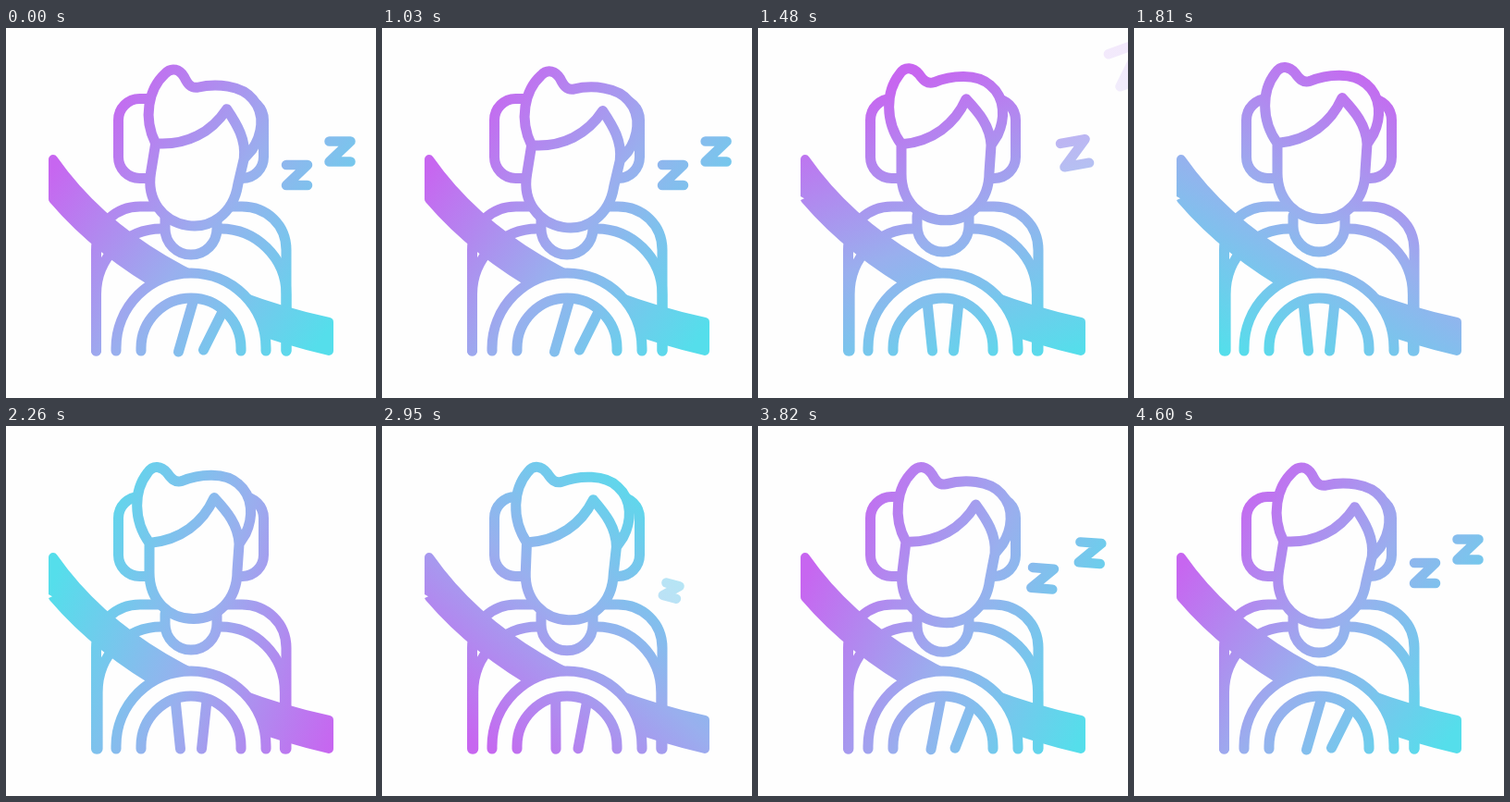
An HTML page with a canvas that plays this animation: 400 px wide and 400 px high, repeating every 4.63 s.

```html
<!DOCTYPE html>
<html lang="en">
<head>
<meta charset="utf-8">
<title>Drowsy driver</title>
<style>
html, body { margin: 0; width: 100%; height: 100%; overflow: hidden; background: #fefefe; }
canvas { display: block; width: 400px; height: 400px; }
</style>
</head>
<body>
<canvas id="stage" width="400" height="400"></canvas>
<script>
const ctx = document.getElementById('stage').getContext('2d');
const LOOP = 4630, START = 1030, END = 4600;
const PAPER = '#fefefe', PURPLE = '#c766f0', MIDDLE = '#99afee', CYAN = '#55deeb';
const LINE = 11;

const headrest = new Path2D();
headrest.roundRect(121.5, 76.5, 157, 86, 23);
const seat = new Path2D('M97.5 349V240C97.5 213 118 193 145 193H255C282 193 303 213 303 240V349');
const belt = new Path2D('M51 142C112 229 212 287 349 318V349C240 323 129 276 51 185Z');
const wheelDisc = new Path2D('M119 349V346A81 81 0 0 1 281 346V349Z');
const wheelRim = new Path2D('M119 349V346A81 81 0 0 1 281 346V349M146 349V346A54 54 0 0 1 254 346V349');
const zShape = new Path2D('M-11.5 -11H11.5L-11.5 11H11.5');

// Head parts are measured from the point the head turns about.
const hair = 'M-48 -38C-66 -63 -65 -95 -50 -114C-44 -123 -35 -121 -29 -114' +
  'C-24 -107 -20 -103 -13 -105C6 -113 34 -115 48 -102C65 -88 64 -65 56 -48L49 -37';
const jaw = 'L47 -8C47 24 25 44 0 44C-27 44 -48 24 -48 -6V-38';
const fringe = 'M-48 -38C-14 -41 10 -60 22 -87C36 -72 48 -58 49 -37';
const headOutline = new Path2D(hair + jaw);
const headLines = new Path2D(hair + fringe + jaw);

const nearZ = { x: 314.5, y: 159, leave: 1255, arrive: 2800, settle: 4600, sway: 7, rise: 22 };
const farZ = { x: 361, y: 133.5, leave: 1030, arrive: 3150, settle: 4300, sway: 2, rise: 15 };

const mix = (a, b, k) => a + (b - a) * k;
const phase = (t, from, to) => Math.min(1, Math.max(0, (t - from) / (to - from)));
const smooth = u => u * u * (3 - 2 * u);
const bump = (t, from, to) => Math.sin(Math.PI * phase(t, from, to));

function place(path, x, y, degrees, scale = 1) {
  const placed = new Path2D();
  placed.addPath(path, new DOMMatrix().translate(x, y).rotate(degrees).scale(scale));
  return placed;
}

// One full turn of the gradient, quicker at first and settling slowly.
function makePaint(t) {
  const turn = smooth(1 - (1 - phase(t, START, END)) ** 1.5);
  const angle = Math.PI * (.2 + 2 * turn);
  const dx = 172 * Math.cos(angle), dy = 172 * Math.sin(angle);
  const paint = ctx.createLinearGradient(216 - dx, 217 - dy, 216 + dx, 217 + dy);
  [PURPLE, MIDDLE, CYAN].forEach((color, i) => paint.addColorStop(i / 2, color));
  return paint;
}

function fill(path, style) {
  ctx.fillStyle = style;
  ctx.fill(path);
}

function drawZ(z, t) {
  const out = phase(t, z.leave, z.leave + 500);
  const arriving = t > z.arrive;
  const grown = phase(t, z.arrive, z.settle), rest = (1 - grown) ** 1.6;
  const pose = arriving
    ? [z.x - z.sway * Math.sin(Math.PI * grown), z.y + z.rise * rest, 17 * rest, Math.min(1, .3 + 4 * grown)]
    : [z.x + 43 * Math.sin(out * Math.PI / 2), z.y - 116 * out ** 2, -22 * out, 1 + .85 * out ** 2];
  ctx.globalAlpha = arriving ? Math.min(1, 6 * grown) : 1 - out ** 1.7;
  ctx.lineWidth = 10.5;
  ctx.stroke(place(zShape, ...pose));
  ctx.globalAlpha = 1;
}

function drawBody(tilt) {
  const inset = mix(1.6, 0, tilt), left = 97.5 + inset, right = 303 - inset;
  ctx.stroke(new Path2D(`M${left} 349V288C${left} 248 130 217 168 217` +
    `M232 217C270 217 ${right} 248 ${right} 288V349`));
  const neck = mix(214, 217, tilt);
  ctx.stroke(new Path2D(`M172 203V${neck}A28 28 0 0 0 228 ${neck}V203`));
}

function drawHead(t, tilt) {
  const nod = 5 * bump(t, 1000, 1250), jolt = 2 * bump(t, 1400, 2150);
  const pose = [203, 164.5 + 5.5 * tilt + nod - jolt, 9.2 * tilt];
  fill(place(headOutline, ...pose), PAPER);
  ctx.stroke(place(headLines, ...pose));
}

function drawBelt(paint, tilt) {
  ctx.lineWidth = 10;
  fill(belt, paint);
  ctx.stroke(belt);
  if (tilt < .5) fill(new Path2D('M45 181.5L50 184.3L45 186.5Z'), PAPER);
  ctx.lineWidth = LINE;
}

function drawWheel(tilt) {
  fill(wheelDisc, PAPER);
  ctx.stroke(wheelRim);
  for (const side of [-1, 1]) {
    const a = (19 * side + mix(0, 22, tilt)) * Math.PI / 180;
    ctx.beginPath();
    ctx.moveTo(200 + 52 * Math.sin(a), 346 - 52 * Math.cos(a));
    ctx.lineTo(200 + side * mix(11.5, 13.5, tilt), 349 - side * tilt);
    ctx.stroke();
  }
}

function draw(t) {
  const tilt = 1 - smooth(phase(t, 1090, 1450)) + smooth(phase(t, 2170, END));
  const paint = makePaint(t);
  ctx.fillStyle = PAPER;
  ctx.fillRect(0, 0, 400, 400);
  ctx.lineCap = ctx.lineJoin = 'round';
  ctx.lineWidth = LINE;
  ctx.strokeStyle = paint;

  ctx.stroke(headrest);
  ctx.stroke(seat);
  drawBody(tilt);
  drawHead(t, tilt);
  drawBelt(paint, tilt);
  drawWheel(tilt);
  drawZ(nearZ, t);
  drawZ(farZ, t);
}

const start = performance.now();
function frame() {
  draw((performance.now() - start) % LOOP);
  requestAnimationFrame(frame);
}
frame();
</script>
</body>
</html>
```
